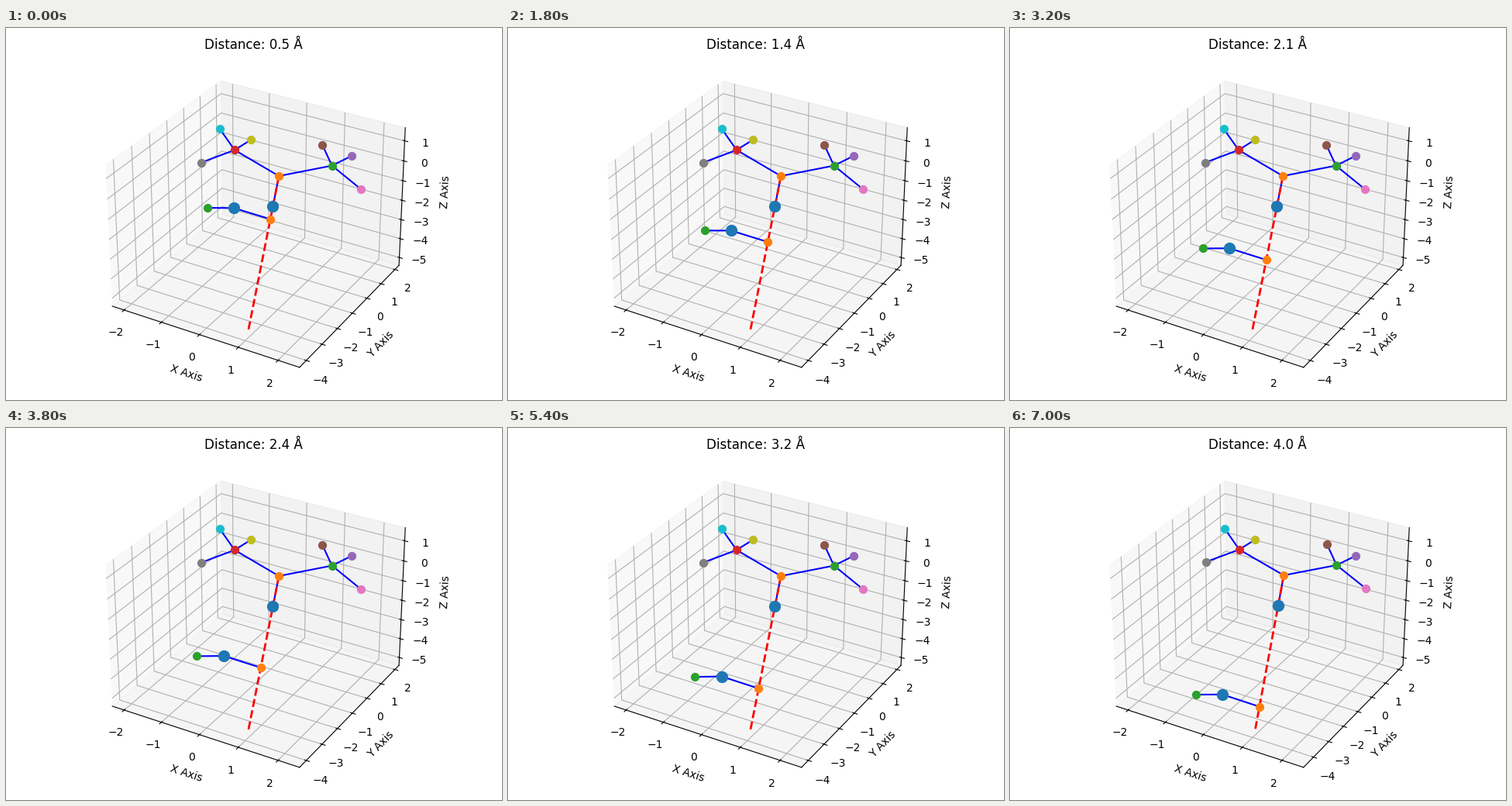
These frames come from a looping animation (640x480 px, 7200 ms). A matplotlib script:

```python
import numpy as np
import matplotlib.pyplot as plt
from matplotlib.animation import FuncAnimation

FRAMES, INTERVAL = 36, 200
SIZES = {"O": 100, "C": 50, "H": 50}

# Bond lengths in ångström, angles in radians
CO, CC, CH, OH = 1.23, 1.516, 1.1, 0.96
CC_ANGLE = np.radians(60.5)
WATER_ANGLE = np.radians(111)
THIRD_TURN = 2 * np.pi / 3

# The acetone plane: along the C=O bond, across it, and its normal
CARBON = np.array([0.10, 0.259, -0.696])
ALONG = np.array([0.158, -0.6966, -0.6998])
ACROSS = np.array([0.9765, -0.0125, 0.2148])
NORMAL = np.cross(ALONG, ACROSS)
OXYGEN = CARBON + CO * ALONG
AXIS_END = CARBON + 6.08 * ALONG

# The water plane
WATER_X = np.array([1, 0, -0.03])
WATER_Y = np.array([0, -0.91, 0.42])

fig = plt.figure(figsize=(6.4, 4.8), dpi=100)
ax = fig.add_axes([104.75 / 640, 15 / 480, 430 / 640, 430 / 480],
                  projection="3d")


def methyl(side, start):
    """Carbon and three tetrahedral hydrogens on one side of the C=O bond."""
    cos, sin = np.cos(CC_ANGLE), np.sin(CC_ANGLE)
    axis = -cos * ALONG + side * sin * ACROSS
    perp = sin * ALONG + side * cos * ACROSS
    carbon = CARBON + CC * axis
    turns = start - THIRD_TURN * np.arange(3)
    hydrogens = [
        carbon + CH * (axis / 3 + np.sqrt(8) / 3
                       * (np.cos(t) * perp + np.sin(t) * NORMAL))
        for t in turns
    ]
    return carbon, hydrogens


def acetone():
    right, right_h = methyl(1, -THIRD_TURN)
    left, left_h = methyl(-1, 0)
    return np.array([OXYGEN, CARBON, right, left, *right_h, *left_h])


def water(distance):
    """Water whose first hydrogen lies on the C=O axis."""
    tip = OXYGEN + distance * ALONG
    oxygen = tip - OH * WATER_X
    other = oxygen + OH * (np.cos(WATER_ANGLE) * WATER_X
                           + np.sin(WATER_ANGLE) * WATER_Y)
    return np.array([oxygen, tip, other])


def draw_molecule(atoms, elements, bonds):
    for i, j in bonds:
        ax.plot(*atoms[[i, j]].T, color="blue")
    for k, (atom, element) in enumerate(zip(atoms, elements)):
        ax.scatter(*atom, s=SIZES[element], color=f"C{k}", depthshade=False)


def padded(low, high):
    pad = (high - low) * 7 / 96
    return low - pad, high + pad


ACETONE = acetone()
ACETONE_BONDS = [(1, k) for k in (0, 2, 3)] + [
    (2 + k // 3, 4 + k) for k in range(6)]


def update(frame):
    distance = 0.5 + 0.1 * frame
    guest = water(distance)

    ax.clear()
    draw_molecule(ACETONE, "OCCCHHHHHH", ACETONE_BONDS)
    draw_molecule(guest, "OHH", [(0, 1), (0, 2)])
    ax.plot(*np.array([CARBON, AXIS_END]).T, color="red", ls="--", lw=2)

    # The y range grows once the water passes the end of the axis
    ax.set_xlim(*padded(-2.013, 2.223))
    ax.set_ylim(*padded(min(-3.99, guest[:, 1].min()), 1.875))
    ax.set_zlim(*padded(-4.965, 1.2))
    ax.set_xlabel("X Axis")
    ax.set_ylabel("Y Axis")
    ax.set_zlabel("Z Axis")
    ax.set_title(f"Distance: {distance:.1f} Å")
    return []


anim = FuncAnimation(fig, update, frames=FRAMES, interval=INTERVAL,
                     init_func=lambda: update(0), repeat=True, repeat_delay=0)
plt.show()
```
